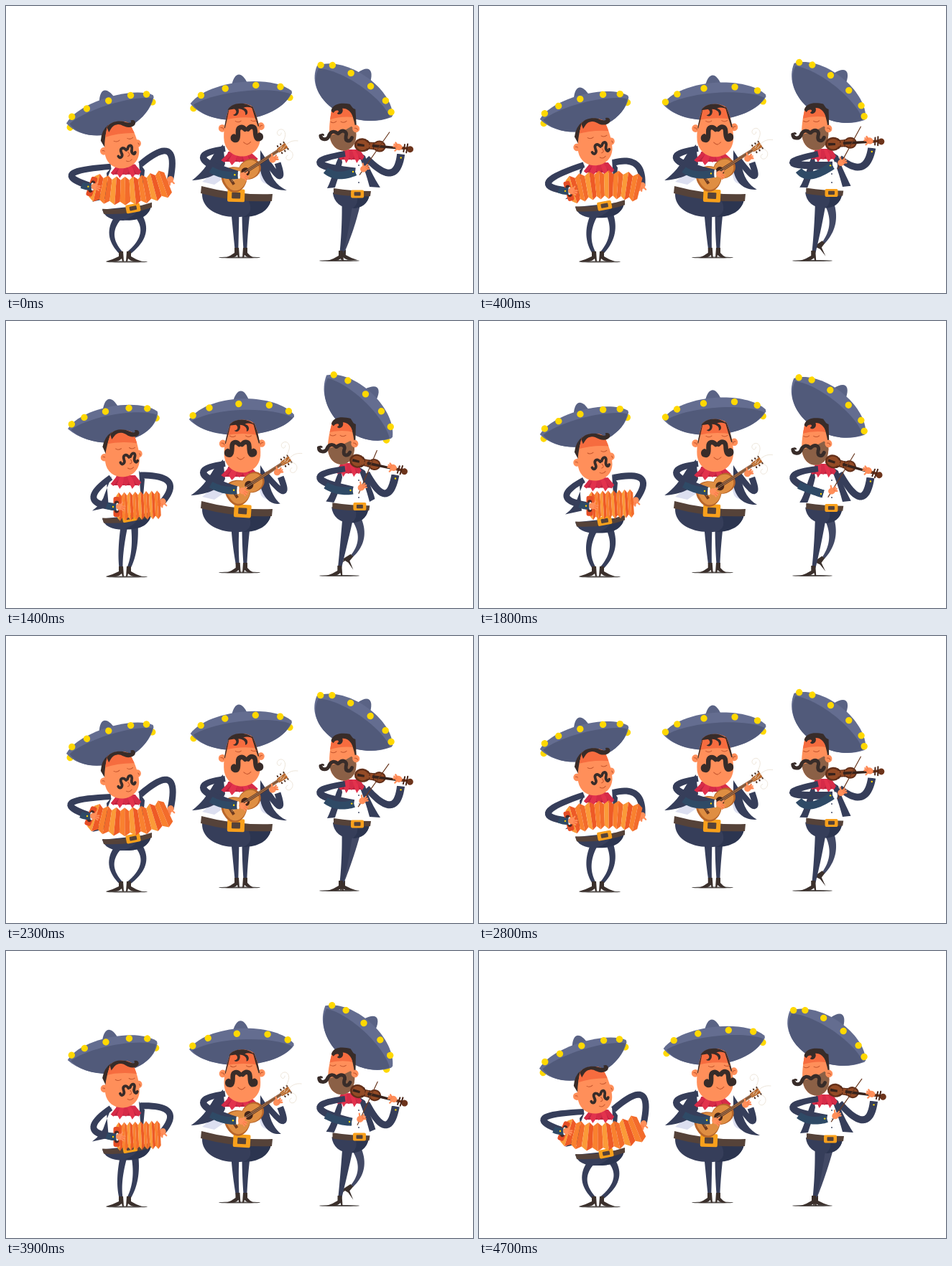
An HTML page with a canvas that plays this animation: 650x400 px, repeating every 4800 ms.

```html
<!DOCTYPE html>
<html lang="en">
<head>
<meta charset="utf-8">
<title>Mariachi trio</title>
<style>
html, body { margin: 0; width: 100%; height: 100%; overflow: hidden; background: #fff; }
canvas { display: block; width: 650px; height: 400px; }
</style>
</head>
<body>
<canvas id="stage" width="650" height="400"></canvas>
<script>
const g = document.getElementById('stage').getContext('2d');
const C = {
  brim: '#646d90', under: '#515a7a', crown: '#5a6385', gold: '#ffd800', suit: '#363e5a', suitLo: '#424965',
  dark: '#2c3550', sleeve: '#2f4a66', skin: '#ff8f5a', shade: '#f66c3f', line: '#c4562f', hair: '#382c29',
  red: '#e2324d', redLo: '#bd2340', belt: '#554239', buckle: '#f8a01c', shoe: '#3b302c', lining: '#dcdff0'
};
const PERIOD = 2400;
let t = 0;
let sway = 0;  // 0 crouched, 1 stretched
let lift = 0;  // rises quickly out of the crouch

const blend = (a, b, k) => a + (b - a) * k;
const mix = (a, b) => blend(a, b, sway);
const wave = (mid, amp, peak) => mid + amp * Math.cos(2 * Math.PI * (t - peak) / PERIOD);
const rad = deg => deg * Math.PI / 180;

function fill(color, d) {
  g.fillStyle = color;
  g.fill(new Path2D(d));
}
function stroke(color, w, d) {
  g.strokeStyle = color;
  g.lineWidth = w;
  g.lineCap = g.lineJoin = 'round';
  g.stroke(new Path2D(d));
}
function oval(color, x, y, rx, ry = rx) {
  g.fillStyle = color;
  g.beginPath();
  g.ellipse(x, y, rx, ry, 0, 0, 7);
  g.fill();
}
function box(color, w, h, r) {
  g.fillStyle = color;
  g.beginPath();
  g.roundRect(-w / 2, -h / 2, w, h, r);
  g.fill();
}
function place(x, y, deg, draw) {
  g.save();
  g.translate(x, y);
  g.rotate(rad(deg));
  draw();
  g.restore();
}
function both(draw) {
  draw();
  g.save();
  g.scale(-1, 1);
  draw();
  g.restore();
}

// Tapered tube from a to b whose middle passes through the joint m
function limb(color, [ax, ay], [mx, my], [bx, by], w0, w1) {
  const n = 20, left = [], right = [];
  const curve = (a, m, b, s) => {
    const r = 1 - s, q = (8 * m - a - b) / 6, d = (b - a) / 6, c1 = q - d, c2 = q + d;
    return [r * r * r * a + 3 * r * r * s * c1 + 3 * r * s * s * c2 + s * s * s * b,
      r * r * (c1 - a) + 2 * r * s * (c2 - c1) + s * s * (b - c2)];
  };
  for (let i = 0; i <= n; i++) {
    const [x, vx] = curve(ax, mx, bx, i / n), [y, vy] = curve(ay, my, by, i / n);
    const h = blend(w0, w1, i / n) / 2 / (Math.hypot(vx, vy) || 1);
    left.push([x - vy * h, y + vx * h]);
    right.unshift([x + vy * h, y - vx * h]);
  }
  fill(color, 'M' + left.concat(right).join('L') + 'Z');
}

function hand(x, y, deg) {
  place(x, y, deg, () => {
    oval(C.skin, 0, 0, 5, 4.5);
    for (const a of [-75, -25, 0, 25]) place(0, 0, a, () => stroke(C.skin, 2.2, 'M2 0L7.5 0'));
    stroke(C.shade, .7, 'M3-1L7-2M3 1L7 2');
  });
}
function cuff(x, y) {
  stroke('#fff', 3, `M${x + 2} ${y - 4}L${x + 2} ${y + 4}`);
  oval(C.gold, x - 4, y, 1.2);
}

// Buttons sit evenly around the rim and turn with it
function hat(x, y, deg, len, top, low, skew, gap, turn) {
  const rim = front => {
    for (let k = -3; k <= 3; k++) {
      const a = turn + gap * k, hid = Math.abs(a) > 88;
      if (hid === front || Math.abs(a) > 100) continue;
      oval(C.gold, len * .95 * Math.sin(rad(a)), hid ? 9 : 1 - top * .56 * Math.cos(rad(a)), 4.7);
    }
  };
  place(x, y, deg, () => {
    const b = 3 - top * .75, h = len * .66;
    rim(false);
    fill(C.crown, `M-11 ${b}C-5 ${b - 18} 5 ${b - 18} 11 ${b}Z`);
    const lower = `C${skew + h} ${low} ${skew - h} ${low}`;
    fill(C.brim, `M${-len} 2C${-len * .62} ${-top} ${len * .62} ${-top} ${len} 0L${len} 3${lower} ${-len} 2Z`);
    fill(C.under, `M${4 - len} 4C${-len * .5} ${-top * .4} ${len * .55} ${-top * .4} ${len - 2} 4${lower} ${4 - len} 4Z`);
    rim(true);
  });
}

// Pear shaped face; inside() is clipped to it
function face(w, h, inside) {
  const half = s => `${s * .97 * w} ${.35 * h}`;
  const d = `M${-.62 * w} ${-.85 * h}C${-.85 * w} ${-.4 * h} ${-w} 0 ${half(-1)}C${-.85 * w} ${1.2 * h} ${.85 * w} ${1.2 * h} ${half(1)}`
    + `C${w} 0 ${.9 * w} ${-.4 * h} ${.66 * w} ${-.85 * h}C${.35 * w} ${-1.05 * h} ${-.35 * w} ${-1.05 * h} ${-.62 * w} ${-.85 * h}Z`;
  fill(C.skin, d);
  g.save();
  g.clip(new Path2D(d));
  fill(C.shade, `M${-w} ${-h}L${w} ${-h}L${w} ${-.4 * h}Q0 ${-.55 * h} ${-w} ${-.4 * h}Z`);
  inside();
  g.restore();
}
const shut = (x, y) => stroke(C.line, 1, `M${x - 4} ${y}Q${x} ${y + 3} ${x + 4} ${y}`);

function ear(x, y) {
  oval(C.skin, x, y, 5, 5.3);
  stroke(C.line, 1, `M${x - 2} ${y - 1}Q${x + 2} ${y - 1} ${x + 2} ${y + 2}`);
}

function scarf(x, y, w) {
  place(x, y, 0, () => {
    fill(C.redLo, `M${-w * .34}-9L${w * .34}-9L${w * .46} 5L${-w * .46} 5Z`);
    for (let i = -2; i <= 2; i++) {
      const tip = i * w * .23, drop = i % 2 ? 10 : 6;
      fill(i % 2 ? C.red : '#d62b48', `M${tip * .5 - 3}-9L${tip * .5 + 4}-9L${tip + w * .1} ${drop - 5}L${tip} ${drop}L${tip - w * .1} 3Z`);
    }
  });
}

function buckle(x, y, deg, w, h) {
  place(x, y, deg, () => {
    box(C.buckle, w, h, 2);
    box(C.belt, w * .5, h * .48, 1);
  });
}
function shoe(x, y, dir, len) {
  place(x, y, 0, () => {
    g.scale(dir, 1);
    fill(C.shoe, `M-3-1L3-1L4 13L2 13L1 9Q-3 13-8 13L${-len} 13Q${-len * .5} 10-3 6Z`);
  });
}
const ground = (x, y, r) => oval('#55504e', x, y, r, 1.1);

// Open while he rises, snapped shut at the top, pulled open on the way down
function squeeze() {
  const s = (t + 100) % PERIOD;
  if (s <= 900) return 1 - .35 * s / 900;
  if (s < 1900) return 0;
  const k = (s - 1900) / 500;
  return k * k * (3 - 2 * k);
}

function bellows(lx, ly, rx, ry, sag) {
  const n = 8;
  const rib = i => {
    const s = i / 2 / n, x = blend(lx, rx, s), y = blend(ly, ry, s) + sag * 4 * s * (1 - s);
    const a = Math.atan2(ry - ly + sag * 4 * (1 - 2 * s), rx - lx), h = i % 2 ? 20 : 15;
    const dx = Math.sin(a) * h, dy = Math.cos(a) * h;
    return [[x + dx, y - dy], [x - dx, y + dy]];
  };
  const tones = ['#fb9a38', '#ee5a26', '#f9812f', '#f36b2b'];
  for (let i = 0; i < 2 * n; i++) {
    const a = rib(i), b = rib(i + 1);
    fill(tones[i % 4], 'M' + [a[0], b[0], b[1], a[1]].join('L') + 'Z');
  }
  place(lx, ly, Math.atan2(sag * 4, rx - lx) * 57.3, () => {
    box('#e64d25', 9, 28, 3);
    box('#4b2a25', 6, 17, 3);
  });
}

function accordionist() {
  const open = squeeze();
  const lx = blend(154, 118, open), ly = 251 + 8 * lift, rx = blend(215, 226, open), ry = 245 + 11 * lift;

  limb(C.suit, [mix(162, 166), mix(288, 280)], [mix(147, 163), 316], [160, 344], 10, 5);
  limb(C.suit, [mix(181, 178), mix(288, 280)], [mix(191, 176), 316], [171, 344], 10, 5);
  ground(168, 356.5, 29);
  shoe(160, 343, 1, 21);
  shoe(171, 343, -1, 18);

  place(0, mix(10, 0), 0, () => {
    fill(C.suit, 'M134 274L202 267C201 281 188 289 168 289C148 290 137 285 134 274Z');
    fill(C.dark, 'M165 288Q182 282 184 272L202 269C199 285 182 290 165 288Z');
    fill(C.belt, 'M134 273Q170 275 203 264L203 271Q172 282 136 280Z');
    buckle(mix(177, 171), 272, -11, 20, 12);
    fill('#fff', 'M147 214L186 210L196 240L200 262L136 270Z');
    fill(C.suit, 'M147 215L140 223L143 258L120 263Q134 253 138 238ZM185 207L193 219L191 242L187 236Z');
  });

  const palm = [rx + 3, ry - 4];
  limb(C.suit, [187, mix(221, 214)], [226 - 11 * lift * open, 201 + 23 * lift], palm, 9, 9);
  limb(C.suit, [146, mix(224, 217)], [lx - 27 - 5 * (1 - open), 233 + 14 * lift], [lx, ly], 8, 10);

  scarf(167, mix(230, 223), 38);
  hat(mix(144, 149), mix(143, 136), mix(-17.3, -8.8), 63.5, mix(21, 25), mix(45, 42), mix(-3, 12), 32, mix(2, -9));
  place(mix(160, 162), mix(194, 183), mix(-8.5, 0), () => {
    fill(C.hair, 'M-14-30Q-24-24-27-10L-22 2L-12-20Z');
    ear(-25, 5);
    ear(23, 1);
    face(24.5, 33, () => {});
    fill(C.hair, 'M-16-27C-10-36 6-34 10-31C17-28 20-28 18-32C26-34 27-24 18-23C8-22 6-29-1-29C-8-29-10-25-14-20Z');
    shut(-5, -7);
    shut(14, -8);
    place(mix(-4, 0), mix(3, 0), 0, () => {
      stroke(C.hair, 3.8, 'M10 5C6-1 1 2 3 8C5 13 0 17-2 12M12 4C15-3 20-1 18 5C16 10 20 15 22 10');
      stroke(C.line, 1, 'M8 20Q12 23 16 19M12 8Q16 13 11 14');
    });
  });

  hand(...palm, 120);
  bellows(lx, ly, rx, ry, open * (11 - 23 * lift));
  limb(C.sleeve, [lx - 14, ly - 2], [lx - 7, ly], [lx, ly], 9, 10);
  cuff(lx - 1, ly);
  hand(lx + 4, ly, 20);
}

function guitar() {
  place(mix(329, 335), mix(234, 231), -33, () => {
    const shell = (color, k) => fill(color, `M${-30 * k} 0C${-30 * k} ${-22 * k} ${-10 * k} ${-22 * k} 1 ${-10 * k}C${10 * k} ${-17 * k} ${28 * k} ${-14 * k} ${28 * k} 0`
      + `C${28 * k} ${14 * k} ${10 * k} ${17 * k} 1 ${10 * k}C${-10 * k} ${22 * k} ${-30 * k} ${22 * k} ${-30 * k} 0Z`);
    shell('#b8662a', 1);
    shell('#df8e42', .9);
    oval('#45261a', 5, 0, 6);
    fill('#6d3b20', 'M10-2.5L60-2L60 2L10 2.5ZM-20-6L-16-6L-16 6L-20 6Z');
    fill('#b8662a', 'M59-3L73-4L73 4L59 3Z');
    for (let x = 62; x < 74; x += 5) stroke('#4a2b1d', 2, `M${x}-6L${x}-5M${x} 5L${x} 6`);
    stroke('#e9c79a', .5, 'M-18-1L68-1M-18 1L68 1');
  });
  place(mix(389, 396), mix(197, 193), 0, () =>
    stroke('#e9dfd0', .8, 'M-7 2C-5-8 3-16-2-23C-6-28-14-23-11-18C-9-15-6-17-6-20M-4 3C2-8 10-10 17-9M0 4C10 2 13 12 7 17C1 20-2 13 3 11'));
}

function guitarist() {
  const strum = [wave(331, 5, 650), wave(236, -2, 650)];
  limb(C.suit, [319, 288], [320, 315], [mix(321, 323), 342], 11, 4.5);
  limb(C.suit, [334, 288], [333, 315], [333, 342], 11, 4.5);
  ground(325, 350.5, 29);
  shoe(mix(321, 323), 338, 1, 16);
  shoe(333, 338, -1, 12);

  fill(C.suit, 'M273 261C272 281 292 294 320 294C350 294 367 285 369 269Z');
  fill(C.dark, 'M336 268L369 269C366 286 351 294 330 294Q347 288 336 268Z');
  fill('#fff', 'M300 202L355 200L374 262L276 254Z');
  fill(C.lining, 'M300 223L303 240L290 249L273 245ZM352 232L363 231L374 248Q361 251 355 243Z');
  fill(C.belt, 'M272 251Q320 264 371 262L370 272Q318 274 271 261Z');
  buckle(mix(320, 331), mix(264, 265), mix(2, 4), 24, 18);

  fill(C.suit, `M302 193L305 220C300 233 281 242 ${mix(259, 257)} 243C272 233 280 222 289 207Z`);
  fill(C.suit, `M354 201L365 218C367 238 376 250 ${mix(391, 380)} ${mix(257, 254)}C370 257 358 248 354 229Z`);
  limb(C.suit, [360, 212], [mix(380, 386), 237], [mix(378, 383), mix(219, 217)], 8, 9);

  scarf(325, 212, 46);
  hat(mix(327, 328), mix(126, 134), mix(-6.5, -1), mix(71, 73.5), mix(27, 34), mix(42, 32), 0, 37, mix(-18, 0));
  place(mix(328, 329), mix(173, 175), mix(-3, 0), () => {
    both(() => ear(-27, -4));
    face(26, 37, () => both(() => fill(C.hair, 'M-28-38L-14-38L-19-18L-23-4L-30-4Z')));
    fill(C.hair, 'M-18-29C-12-40 10-40 18-29L14-31Q8-33 4-31C12-29 10-20 6-21C8-27 1-30-3-30C-1-23-7-18-11-22C-4-23-6-29-9-30Z');
    place(mix(7, -4), mix(3, 1), 0, () => both(() => {
      shut(-11, -16);
      stroke(C.hair, 6.5, 'M-2-4C-6-9-12-8-12-1C-12 7-13 12-18 10C-20 9-20 6-18 5');
      stroke(C.line, 1, 'M-5 14Q-2 17 0 17');
    }));
  });

  guitar();
  hand(mix(371, 379), mix(214, 210), -25);
  const [hx, hy] = strum, wrist = [hx - 8, hy - 1];
  limb(C.suit, [305, 199], [275, 213], wrist, 8, 11);
  limb(C.sleeve, [285, 228], [303, 235], wrist, 9, 11);
  cuff(...wrist);
  hand(hx, hy, 35);
}

function violin() {
  for (const [color, k] of [['#63301a', 1], ['#944b26', .75]]) {
    oval(color, 11, 0, 11 * k, 9.5 * k);
    oval(color, 35, 0, 9 * k, 8 * k);
    place(23, 0, 0, () => box(color, 24, 10 * k, 2));
  }
  stroke('#4a2416', 1, 'M18-7Q22-3 21-1M18 7Q22 4 21 2M27-5L27 5');
  fill('#37231c', 'M4-2L14-1L14 2L4 2ZM25-2L68-1L68 2L25 2Z');
  oval('#6d341b', 78, 1, 4.5);
  stroke('#6d341b', 3.5, 'M66 0L76 0');
  stroke('#4a2416', 2, 'M70-5L69 5M74-6L73 6');
}

function violinist() {
  const ankle = [blend(469, 482, lift), blend(342, 327, lift)];
  place(...ankle, 20 * lift, () => {
    if (lift > .1) fill(C.shoe, 'M-3-1L2 0L-1 8L8 18L-2 11L-7 10L-9 13L-10 8Z');
    else shoe(0, 0, -1, 20);
  });
  limb(C.suitLo, [487, 274], [blend(479, 494, lift), blend(308, 302, lift)], ankle, 13, 4);
  limb(C.suit, [mix(475, 476), 274], [mix(472, 470), 309], [mix(467, 464), 344], 15, 5);
  ground(464, 355, 28);
  shoe(mix(466, 464), 342, 1, 18);

  place(mix(2, 0), mix(1, 0), 0, () => {
    fill(C.suit, 'M453 259L504 261C503 274 492 280 479 281C464 281 454 272 453 259Z');
    fill(C.dark, 'M486 262L504 262C502 275 492 281 481 281Q490 274 486 262Z');
    fill('#fff', 'M464 207L492 203L506 257L456 255Z');
    fill(C.belt, 'M454 253Q480 257 506 257L505 264Q478 265 454 261Z');
  });
  buckle(mix(489, 493), mix(262, 258), 0, 18, 11);
  fill(C.suit, `M466 205L468 218C464 236 460 246 ${mix(458, 456)} 253L${mix(447, 445)} ${mix(254, 251)}C455 240 456 222 466 205Z`);
  fill(C.suit, `M488 201L500 209C504 224 512 239 ${mix(521, 512)} ${mix(253, 247)}L506 252C502 237 496 218 488 201Z`);
  for (let y = 222; y < 250; y += 12) oval(C.suit, 491, y, .9);

  const vx = mix(485, 477), vy = 193, tilt = wave(5.5, 10, 1750);
  const fx = vx + 62 * Math.cos(rad(tilt)), fy = vy + 62 * Math.sin(rad(tilt)) - 1;
  limb(C.suit, [502, 212], [fx - 12, fy + 36], [fx + 3, fy + 10], 9, 11);
  stroke('#fff', 3, `M${fx - 2} ${fy + 8}L${fx + 7} ${fy + 8}`);
  oval(C.gold, fx + 3, fy + 15, 1.2);

  scarf(mix(481, 476), mix(209, 207), 32);
  hat(mix(486, 494), mix(117, 118), mix(34, 46), 63, 32, mix(51, 49), mix(-12, 0), 32, mix(-18, -3));
  place(mix(468, 466), mix(170, 168), mix(-6, 0), () => {
    fill(C.hair, 'M8-31L21-24L20 0L13-6Z');
    face(19, 32, () => fill('#8b6046', 'M-20 9L0 5L13-1L20 6L14 34L-20 34Z'));
    ear(19, 3);
    fill(C.hair, 'M-13-25C-10-36 4-35 14-32L20-22L17-12C15-22 9-27 3-27C5-20-3-17-5-21C1-24-6-28-10-22Z');
    shut(-11, -10);
    shut(3, -9);
    stroke(C.hair, 5, 'M-7 7C-13 1-18 5-20 10C-23 15-31 14-31 8M-6 7C1 1 7 6 4 12C2 20 9 21 12 15');
    stroke(C.hair, 2.5, 'M-31 8Q-29 5-27 7');
  });

  place(vx, vy, tilt, violin);
  hand(fx, fy, -150);

  const tip = [wave(525, 9, 100), wave(176, 9, 1800)], grip = [wave(498, -7, 1800), wave(227, 10, 1800)];
  const wrist = [grip[0] - 12, grip[1] + 4], k = .16;
  limb(C.suit, [472, 206], [437, 219], wrist, 8, 11);
  limb(C.sleeve, [445, 229], [463, 236], wrist, 10, 11);
  oval('#fff', wrist[0] + 4, wrist[1], 3, 5);
  oval(C.gold, wrist[0] - 3, wrist[1], 1.2);
  stroke('#6b3a22', 1.2, `M${tip}L${blend(grip[0], tip[0], -k)} ${blend(grip[1], tip[1], -k)}`);
  hand(...grip, -25);
}

function frame(now) {
  t = Math.floor(now / 100) * 100 % PERIOD;
  sway = wave(.5, .5, 1090);
  lift = 1 - (1 - sway) ** 4;
  g.fillStyle = '#fff';
  g.fillRect(0, 0, 650, 400);
  accordionist();
  guitarist();
  violinist();
}

const start = performance.now();
function loop() {
  frame(performance.now() - start);
  requestAnimationFrame(loop);
}
loop();
</script>
</body>
</html>
```
